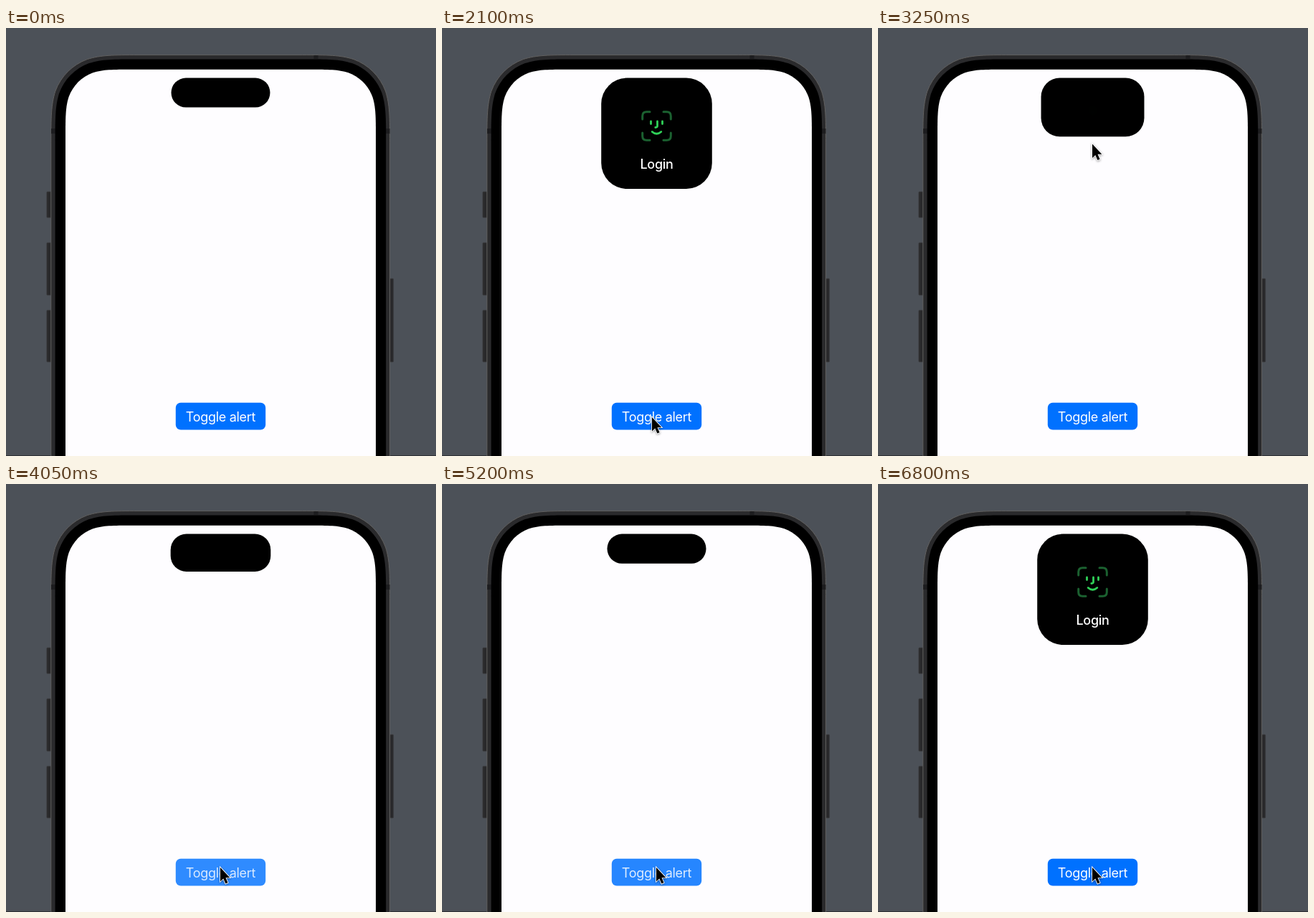
These frames come from a looping animation (600 px wide and 596 px high, 6850 ms). An HTML page:

```html
<!DOCTYPE html>
<html lang="en">
<head>
<meta charset="utf-8">
<title>Toggle alert</title>
<style>
  html, body { margin: 0; width: 100%; height: 100%; overflow: hidden; background: #4c5158; }
  svg { display: block; width: 600px; height: 596px; }
  text { font-family: Inter, Roboto, sans-serif; font-size: 18px; letter-spacing: -.3px; text-anchor: middle; fill: #fff; }
  .side { fill: #29292b; stroke: #3a3b3e; stroke-width: .8; }
  .band { fill: #1d1d1f; }
  .icon { fill: none; stroke-linecap: round; stroke-linejoin: round; stroke-width: 3; }
  #cursor { filter: drop-shadow(0 1.5px 1.5px rgba(0, 0, 0, .4)); }
</style>
</head>
<body>
<svg viewBox="0 0 600 596">
  <rect width="600" height="596" fill="#4c5158"/>
  <rect y="595" width="600" height="1" fill="#2e3034"/>

  <g class="side">
    <rect x="56.9" y="228" width="7" height="36" rx="1"/>
    <rect x="56.9" y="299" width="7" height="73" rx="1"/>
    <rect x="56.9" y="393" width="7" height="72" rx="1"/>
    <rect x="534" y="349" width="6.6" height="116" rx="1"/>
  </g>
  <path id="rim" fill="#2a2a2c" stroke="#626160"/>
  <rect class="band" x="63" y="140" width="6" height="7"/>
  <rect class="band" x="530" y="140" width="5.5" height="7"/>
  <rect class="band" x="429.5" y="38" width="6" height="5"/>
  <path id="bezel"/>
  <path id="screen" fill="#fefdff"/>

  <rect id="button" x="236.8" y="521.8" width="125.4" height="37.7" rx="7"/>
  <text id="label" x="299.5" y="547.6">Toggle alert</text>

  <rect id="island" y="69.6"/>
  <g id="blur">
    <g id="content">
      <g class="icon" transform="translate(0 -10.3)">
        <g id="brackets" stroke="#1b6130"></g>
        <path stroke="#30d158" stroke-width="2.8" d="M-8 -6.5V-3 M8 -6.5V-3 M1 -6.5V0Q1 2-1.7 2 M-6.3 8Q0 13.6 6.3 8"/>
      </g>
      <text y="49.6" font-weight="500">Login</text>
    </g>
  </g>

  <path id="cursor" d="M0 0V19.4L4.3 15.4L7.4 22.6L10.6 21.2L7.5 14.2H13.4Z"
        stroke="#fff" stroke-width="1.7" paint-order="stroke"/>
</svg>
<script>
const $ = id => document.getElementById(id);
const set = (id, attrs) => {
  for (const name in attrs) $(id).setAttribute(name, attrs[name]);
};

// Top half of a panel with continuous-curvature corners, open past the stage bottom.
function panel(left, right, top, r) {
  const corner = [[0, 1.528], [0, 1.088], [0, .868], [.075, .631], [.169, .373],
                  [.373, .169], [.631, .075], [.868, 0], [1.088, 0], [1.528, 0]];
  const curve = points => points[0] + 'C' + points.slice(1).join(' ');
  const tl = corner.map(([x, y]) => `${left + x * r},${top + y * r}`);
  const tr = corner.map(([x, y]) => `${right - x * r},${top + y * r}`).reverse();
  return `M${left},610L${curve(tl)}L${curve(tr)}L${right},610Z`;
}
set('rim', { d: panel(62.8, 535.6, 37.6, 80) });
set('bezel', { d: panel(68.6, 530.2, 43.4, 75) });
set('screen', { d: panel(83, 516, 57.8, 60.6) });
$('brackets').innerHTML = [0, 90, 180, 270].map(a =>
  `<path transform="rotate(${a})" d="M-19.8 -9.5V-14Q-19.8 -19.8-14 -19.8H-9.5"/>`).join('');

const LOOP = 6850, STEP = 50, CX = 299.5;
// Moments of release; the second one taps the alert itself.
const toggles = [1436, 3111, 4016, 4629, 5289];
const taps = toggles.filter((_, i) => i !== 1);
// Cursor stops: time, x, y.
const stops = [[900, 303, 602], [1270, 293, 542], [2420, 293, 542], [2850, 299, 161.5],
               [3270, 299, 161.5], [3530, 299, 534], [LOOP, 299, 534]];

const clamp = v => Math.min(1, Math.max(0, v));
const spring = ms => {
  const k = Math.max(0, ms) * .0157;
  return 1 - (1 + k) * Math.exp(-k);
};
const openness = t => toggles.reduce((p, at, i) => p + (i % 2 ? -1 : 1) * spring(t - at), 0);
const pressed = t => Math.max(...taps.map(at =>
  t < at ? clamp((t - at + 120) / 50) : Math.exp((at - t) / 130)));

function cursorAt(t) {
  const i = stops.findIndex(s => s[0] > t);
  if (i < 1) return null;
  const [a, b] = [stops[i - 1], stops[i]];
  const u = (t - a[0]) / (b[0] - a[0]), e = u * u * (3 - 2 * u);
  return [a[1] + (b[1] - a[1]) * e, a[2] + (b[2] - a[2]) * e];
}

function draw(t) {
  const p = clamp(openness(t));
  const w = 138 + 16.6 * p, h = 41 + 113.4 * p;
  set('island', { x: CX - w / 2, width: w, height: h, rx: 20.5 + 15.5 * p });

  const scale = clamp((p - .2) * 1.25);
  set('content', { transform: `translate(${CX} ${69.6 + h / 2}) scale(${scale})` });
  $('blur').style.opacity = scale > 0 ? p * p : 0;
  $('blur').style.filter = p > .99 ? 'none' : `blur(${11 * (1 - p)}px)`;

  const light = .24 * pressed(t);
  set('button', { fill: `rgb(${255 * light},${113 + 142 * light},255)` });
  set('label', { opacity: 1 - light });

  const at = cursorAt(t);
  set('cursor', { visibility: at ? 'visible' : 'hidden' });
  if (at) set('cursor', { transform: `translate(${at})` });
}

function tick(now) {
  draw(Math.floor(now % LOOP / STEP) * STEP);
  requestAnimationFrame(tick);
}
draw(0);
requestAnimationFrame(tick);
</script>
</body>
</html>
```
